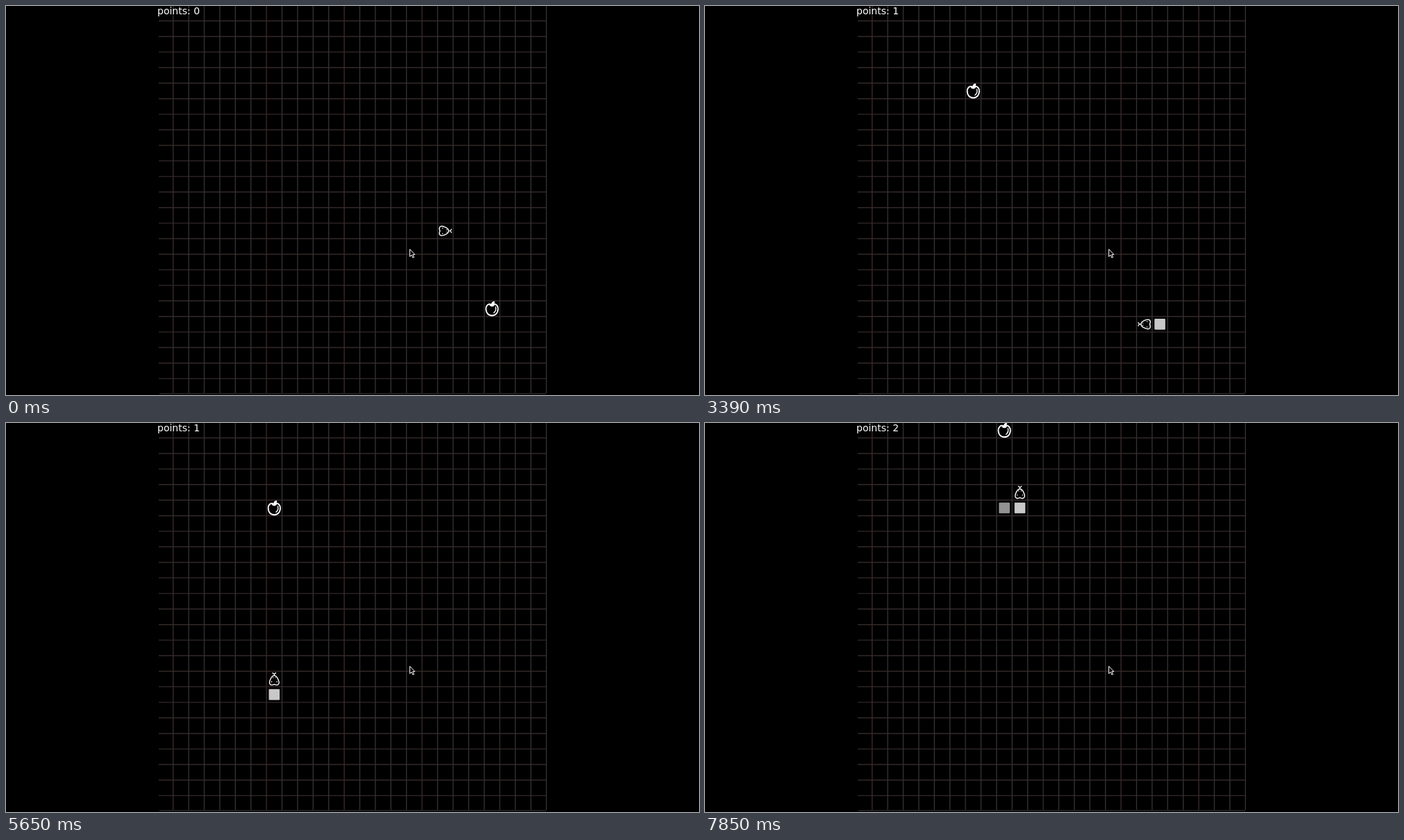
Write an HTML page that moves like this. It is 998 px wide and 561 px high and loops after 8 s.

```html
<!DOCTYPE html>
<html lang="en">
<head>
<meta charset="utf-8">
<title>Snake</title>
<style>
  html, body { margin: 0; width: 100%; height: 100%; overflow: hidden; background: #000; }
  svg { display: block; width: 100%; height: 100%; }
  text { font: 14px "DejaVu Sans", sans-serif; fill: #fff; white-space: pre; }
  .line { fill: none; stroke: #fff; stroke-linecap: round; stroke-linejoin: round; }
</style>
</head>
<body>
<svg viewBox="0 0 998 561">
  <g id="grid" fill="none" stroke-width="1.4"></g>

  <g id="apple" class="line" stroke-width="1.9">
    <path d="M0-5.2C-2-7-5-7-7-4.8C-9.6-1.8-9 4-6.4 7.2C-4.2 9.8-2 10 0 10C2 10 4.2 9.8 6.4 7.2C9 4 9.6-1.8 7-4.8C5-7 2-7 0-5.2Z"/>
    <path stroke-width="1.7" d="M-2.8-5.2Q0-2.6 2.8-5.2M0-4.6Q-.8-9 3-9.8Q3-6.8 .4-6.4"/>
    <path stroke-width="1.4" d="M5.2-2.4Q6.6 2.8 2.6 6"/>
  </g>

  <rect class="segment" x="-7.8" y="-7.8" width="15.6" height="15.6" rx="1" fill="#c8c8c8"/>
  <rect class="segment" x="-7.8" y="-7.8" width="15.6" height="15.6" rx="1" fill="#929292"/>

  <g id="head" class="line" stroke-width="1.4">
    <path d="M0-4.8C3-4.8 4.2-2.6 5.3 0C6.4 2.6 7.8 4.8 6.3 7.1C5 9 2.4 8.9 0 7.7C-2.4 8.9-5 9-6.3 7.1C-7.8 4.8-6.4 2.6-5.3 0C-4.2-2.6-3-4.8 0-4.8Z"/>
    <path stroke-width="1.3" d="M0-5V-7L-2.3-8.8M0-7L2.3-8.8"/>
    <path stroke-width="1.5" d="M-3.8 3.9v.1M3.8 3.9v.1"/>
    <path stroke-width="1.1" d="M-1.7-2.4v.5M1.7-2.4v.5"/>
  </g>

  <path d="M581.6 350.8V361.4L584.1 359.1L585.9 363.1L587.6 362.3L585.8 358.4H588.8Z" fill="#000" stroke="#fff"/>
  <text id="score" x="218" y="12.4">points: 0</text>
</svg>

<script>
const LOOP = 8000, LEFT = 218.3, TOP = -0.9, CELL_W = 22.4, CELL_H = 22.43;
const DIRS = { U: [0, -1, 0], R: [1, 0, 90], D: [0, 1, 180], L: [-1, 0, 270] };
const ROUTE = 'R4 U3 L3 D5 R2 D4 L14 U15 R3 U1';
const APPLES = [[21, 19], [7, 5], [9, 0]];

// [move number, time in ms]; moves between two entries are evenly spaced
const BEATS = [[1, 30], [7, 860], [8, 1020], [9, 1150], [15, 2050], [17, 2370], [18, 2530],
  [23, 3230], [25, 3550], [30, 4300], [31, 4460], [34, 4910], [35, 5040], [38, 5490],
  [39, 5650], [44, 6380], [45, 6540], [46, 6670], [47, 6830], [54, 7850]];

const $ = id => document.getElementById(id);
const segments = document.querySelectorAll('.segment');

function buildGrid() {
  const line = (d, color) => `<path d="${d}" stroke="${color}"/>`;
  let out = '';
  for (let i = 1; i < 25; i++) {
    out += line(`M220 ${TOP + i * CELL_H}H778.5`, '#342929');
  }
  for (let i = 1; i <= 25; i++) {
    const warm = [1, 7, 12, 17, 22].includes(i);
    out += line(`M${LEFT + i * CELL_W} 0V558`, warm ? '#382a2a' : '#313131');
  }
  $('grid').innerHTML = out + line('M221 559H778', '#2b2b2b');
}

function buildTrail() {
  const trail = [{ x: 18, y: 14, angle: 90, points: 0 }];
  for (const run of ROUTE.split(' ')) {
    const [dx, dy, angle] = DIRS[run[0]];
    for (let n = +run.slice(1); n > 0; n--) {
      const last = trail[trail.length - 1];
      const x = last.x + dx, y = last.y + dy;
      const [ax, ay] = APPLES[last.points];
      trail.push({ x, y, angle, points: last.points + (x === ax && y === ay) });
    }
  }
  return trail;
}

function moveAt(time) {
  if (time < BEATS[0][1]) return 0;
  const next = BEATS.findIndex(beat => beat[1] > time);
  if (next < 0) return BEATS[BEATS.length - 1][0];
  const [m0, t0] = BEATS[next - 1], [m1, t1] = BEATS[next];
  return Math.floor(m0 + (time - t0) / (t1 - t0) * (m1 - m0) + 1e-6);
}

function place(node, x, y, angle = 0) {
  const cx = LEFT + (x + 0.5) * CELL_W, cy = TOP + (y + 0.5) * CELL_H;
  node.setAttribute('transform', `translate(${cx} ${cy}) rotate(${angle})`);
}

buildGrid();
const trail = buildTrail();

function draw(now) {
  const move = moveAt(now % LOOP);
  const { x, y, angle, points } = trail[move];
  place($('head'), x, y, angle);
  place($('apple'), ...APPLES[points]);
  segments.forEach((segment, i) => {
    const shown = i < points;
    segment.style.display = shown ? '' : 'none';
    if (shown) place(segment, trail[move - 1 - i].x, trail[move - 1 - i].y);
  });
  $('score').textContent = `points: ${points}`;
}

let start;
function tick(now) {
  start ??= now;
  draw(now - start);
  requestAnimationFrame(tick);
}
draw(0);
requestAnimationFrame(tick);
</script>
</body>
</html>
```
